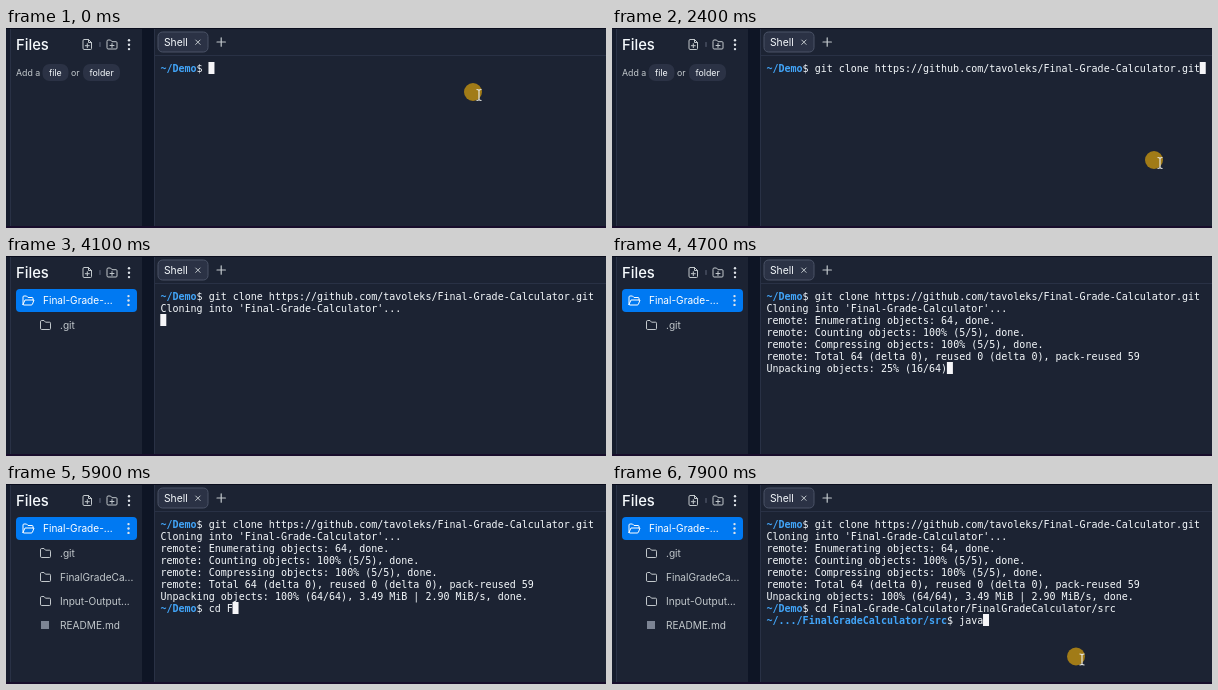
An HTML page that plays this animation: 600x200 px, repeating every 8 s.

```html
<!DOCTYPE html>
<html lang="en">
<head>
<meta charset="utf-8">
<title>Cloning in the shell</title>
<style>
html, body { margin: 0; width: 100%; height: 100%; overflow: hidden; background: #0e1525; }
svg { display: block; width: 600px; height: 200px; }
text { font-family: Inter, "Open Sans", sans-serif; fill: #f5f9fc; white-space: pre; }
.term text { font: 10px "DejaVu Sans Mono", monospace; }
.term .path { font-weight: bold; fill: #42a5f9; }
.small { font-size: 8.8px; }
.row { font-size: 10.1px; fill: #c2c8cc; }
.icon { fill: none; stroke: #c2c8cc; stroke-linecap: round; stroke-linejoin: round; }
</style>
</head>
<body>
<svg viewBox="0 0 600 200">
  <defs>
    <path id="folder" d="M-5 -3.5q0-1 1-1h2.5l1.5 1.7h4q1 0 1 1v5.3q0 1-1 1h-8q-1 0-1-1z"/>
    <g id="dots" fill="#dfe4ea"><circle cy="-4.4" r="1.2"/><circle r="1.2"/><circle cy="4.4" r="1.2"/></g>
  </defs>
  <!-- panels -->
  <path fill="#1c2333" d="M0 1h136v197H0zM148.500 1H600v197H148.500z"/>
  <path fill="#151c2c" d="M0 1h4v197H0z"/>
  <path fill="#293145" d="M4 1h1v197h-1zM148 27h452v1H148zM148 1h1v197h-1z"/>
  <path fill="#0a0d1d" d="M0 0h600v1H0z"/>
  <path fill="#180d2b" d="M0 198h600v2H0z"/>
  <!-- sidebar header -->
  <text x="10" y="22.300" font-size="14.800" font-weight="500">Files</text>
  <g class="icon">
    <path d="M77 12.500q0-1 1-1h4.500l3 3v6q0 1-1 1H78q-1 0-1-1zM82.500 11.500v3h3M81.300 15.700v4M79.300 17.700h4"/>
    <path stroke="#5f677a" d="M94 14.500v4"/>
    <use href="#folder" x="106" y="16.500"/>
    <path d="M106 15.500v4M104 17.500h4"/>
  </g>
  <use href="#dots" x="123" y="16.700"/>
  <!-- tab -->
  <rect x="152" y="4" width="50" height="20" rx="4.500" fill="#2b3245" stroke="#4a5266"/>
  <text x="158" y="17.700" font-size="10.300">Shell</text>
  <path class="icon" d="M189.700 12l4.400 4.400m0-4.400l-4.400 4.400"/>
  <path class="icon" stroke-width="1.200" d="M211 14h8.400M215.200 9.800v8.400"/>
  <g id="empty" class="small">
    <rect x="36.500" y="36" width="26" height="17" rx="7" fill="#2b3245"/>
    <rect x="77" y="36" width="37" height="17" rx="7" fill="#2b3245"/>
    <text class="small" x="10" y="47.600" style="fill:#c2c8cc">Add a</text>
    <text x="43" y="47.600">file</text>
    <text x="65" y="47.600" style="fill:#c2c8cc">or</text>
    <text x="83.500" y="47.600">folder</text>
  </g>
  <g id="tree"></g>
  <g id="term" class="term"></g>
  <g id="mouse">
    <circle r="9" fill="#a17b17"/>
    <path d="M3.500 -2.500q2 0 2.500 1q.5-1 2.500-1M6 -1.500V7.500M3.500 8.500q2 0 2.500-1q.5 1 2.500 1" fill="none" stroke="#e6e6e0" stroke-width="1.200"/>
  </g>
</svg>
<script>
const $ = id => document.getElementById(id);
const LOOP = 8000, STEP = 100, CHAR = 6.02, LEFT = 154.5;
const REPO = "Final-Grade-Calculator";

const treeRow = (name, y) => `<text class="row" x="54" y="${y + 3.7}">${name}</text>` +
  (name.endsWith(".md")
    ? `<rect x="35" y="${y - 4}" width="8" height="8" fill="#7c8494"/>`
    : `<use class="icon" href="#folder" x="39.500" y="${y}"/>`);

function drawTree(t) {
  $("empty").style.display = t < 3700 ? "" : "none";
  if (t < 3700) return "";
  const names = t < 5000 ? [".git"] : [".git", "FinalGradeCa...", "Input-Output...", "README.md"];
  return `<rect x="10" y="33" width="121" height="23" rx="4" fill="#0079f2"/>
    <path class="icon" style="stroke:#fff" d="M17 48.500v-7.500q0-1 1-1h2.500l1.500 1.500h4q1 0 1 1v1.500M17 48.500l2-4.500h9l-1.500 4q-.3 1-1.300 1h-7.200q-1 0-1-.5"/>
    <text class="row" x="37" y="48.200" style="fill:#fff">Final-Grade-...</text>
    <use href="#dots" x="122.500" y="44.500"/>` +
    names.map((n, i) => treeRow(n, 69 + 24 * i)).join("");
}

// Each part: [start, text, ms per character]; 0 means it appears at once
const typed = (t, parts) => parts.map(([start, text, pace]) =>
  t < start ? "" : pace ? text.slice(0, Math.floor((t - start) / pace) + 1) : text).join("");

function unpacking(t) {
  const n = Math.min(64, Math.ceil((t - 4600) / 400 * 64));
  return `Unpacking objects: ${Math.floor(n / 64 * 100)}% (${n}/64)` +
    (n < 64 ? "" : ", 3.49 MiB | 2.90 MiB/s, done.");
}

// Each line: [time shown, prompt path, text]
const lines = t => [
  [0, "~/Demo", "$ " + typed(t, [[700, "git clone ", 120],
    [2100, `https://github.com/tavoleks/${REPO}.git`, 0]])],
  [3400, "", `Cloning into '${REPO}'...`],
  [4200, "", "remote: Enumerating objects: 64, done."],
  [4300, "", "remote: Counting objects: 100% (5/5), done."],
  [4400, "", "remote: Compressing objects: 100% (5/5), done."],
  [4600, "", "remote: Total 64 (delta 0), reused 0 (delta 0), pack-reused 59"],
  [4700, "", unpacking(t)],
  [5000, "~/Demo", "$ " + typed(t, [[5500, "cd F", 120], [6000, REPO.slice(1) + "/", 0],
    [6200, "F", 0], [6300, "inalGradeCalculator/", 0], [6500, "src", 100]])],
  [7100, "~/.../FinalGradeCalculator/src", "$ " + typed(t, [[7400, "java", 120]])]
].filter(line => t >= line[0]);

function drawTerm(t) {
  const shown = lines(t);
  const [, path, text] = shown[shown.length - 1];
  const unfinished = path || (t >= 4700 && t < 5000);
  const entered = (t >= 3200 && t < 3400) || (t >= 7000 && t < 7100) || !unfinished;
  const row = shown.length - (entered ? 0 : 1);
  const col = entered ? 0 : path.length + text.length;
  return shown.map(([, p, s], i) => {
    const y = 43.5 + 12 * i;
    return `<text class="path" x="${LEFT}" y="${y}">${p}</text>
      <text x="${LEFT + p.length * CHAR}" y="${y}">${s}</text>`;
  }).join("") + `<rect x="${LEFT + col * CHAR - .2}" y="${34 + 12 * row}" width="6" height="12" fill="#f5f5f8"/>`;
}

// Pointer stops: [time, x, y]
const stops = [[0, 467, 64], [1900, 467, 64], [2300, 542, 132], [2500, 542, 132], [2700, 575, 75],
  [2900, 615, 65], [7299, 615, 65], [7300, 575, 120], [7700, 464, 172.5], [LOOP, 464, 172.5]];

function pointer(t) {
  const i = stops.findIndex(s => s[0] > t);
  const [t0, x0, y0] = stops[i - 1], [t1, x1, y1] = stops[i];
  const u = (t - t0) / (t1 - t0), k = u * u * (3 - 2 * u);
  return `translate(${x0 + (x1 - x0) * k} ${y0 + (y1 - y0) * k})`;
}

let last = -1;
function frame(now) {
  const t = Math.floor(now % LOOP / STEP) * STEP;
  if (t !== last) {
    last = t;
    $("tree").innerHTML = drawTree(t);
    $("term").innerHTML = drawTerm(t);
    $("mouse").setAttribute("transform", pointer(t));
  }
  requestAnimationFrame(frame);
}
frame(0);
</script>
</body>
</html>
```
